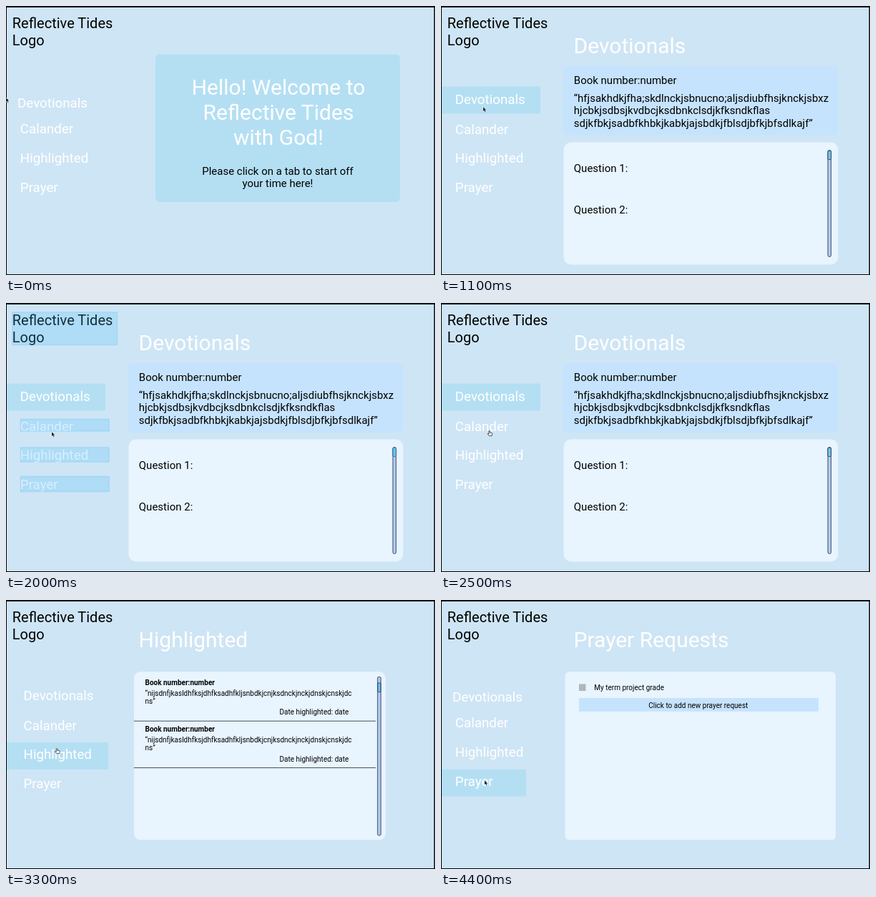
Write an HTML page that moves like this. It is 600 by 376 pixels and loops after 4600 ms.

```html
<!DOCTYPE html>
<html lang="en">
<head>
<meta charset="utf-8">
<title>Devotional app prototype</title>
<style>
  html, body { margin: 0; width: 100%; height: 100%; overflow: hidden; background: #cee5f5; }
  svg { display: block; width: 600px; height: 376px; font-family: Roboto, sans-serif; }

  .logo { font-size: 20px; }
  .nav { font-size: 18.75px; fill: #fff; }
  .title { font-size: 30px; fill: #fff; }
  .body { font-size: 15px; }
  .small { font-size: 10px; }
  .bold { font-weight: 700; }
  .mid { text-anchor: middle; }

  .tab, .card { fill: #b4dff3; }
  .panel { fill: #e8f4fe; }
  .verse { fill: #c6e3fd; }
  .track { fill: #aec8ee; stroke: #28304a; stroke-width: .8; }
  .thumb { fill: #6fc3ec; stroke: #28304a; stroke-width: .8; }
  .rule { stroke: #4a5055; stroke-width: 1; }
  .hint rect { fill: #50c2fa; fill-opacity: .6; stroke: #50bffa; stroke-opacity: .8; stroke-width: 1.5; }

  .page, .hint, .cursor, .arrow, .hand { animation: 4600ms step-end infinite; }
  .home { animation-name: home; }
  .devotionals { animation-name: devotionals; }
  .calendar { animation-name: calendar; }
  .highlighted { animation-name: highlighted; }
  .prayer { animation-name: prayer; }
  .hint { animation-name: hint; }
  .cursor { animation-name: move; }
  .arrow { animation-name: arrow; }
  .hand { animation-name: hand; }

  /* one tick is 100 ms, 1/46 of the loop */
  @keyframes home { 0% { opacity: 1 } 21.73%, 100% { opacity: 0 } }
  @keyframes devotionals { 0% { opacity: 0 } 21.73% { opacity: 1 } 56.52%, 100% { opacity: 0 } }
  @keyframes calendar { 0% { opacity: 0 } 56.52% { opacity: 1 } 71.73%, 100% { opacity: 0 } }
  @keyframes highlighted { 0% { opacity: 0 } 71.73% { opacity: 1 } 86.95%, 100% { opacity: 0 } }
  @keyframes prayer { 0% { opacity: 0 } 86.95%, 100% { opacity: 1 } }

  @keyframes hint {
    0% { opacity: 0 }
    34.78% { opacity: .75 }
    36.95% { opacity: 1; animation-timing-function: steps(5) }
    47.82%, 100% { opacity: 0 }
  }

  @keyframes move {
    0% { transform: translate(0, 128px) }
    2.17% { transform: translate(0, 128px); animation-timing-function: steps(5) }
    13.04% { transform: translate(59px, 133px) }
    23.91% { transform: translate(59px, 141px); animation-timing-function: steps(3) }
    30.43% { transform: translate(64px, 180px) }
    45.65% { transform: translate(64px, 180px); animation-timing-function: steps(4) }
    54.34% { transform: translate(68px, 178px) }
    56.52% { transform: translate(68px, 178px); animation-timing-function: steps(4) }
    65.21% { transform: translate(71.5px, 207px) }
    71.73% { transform: translate(71.5px, 207px); animation-timing-function: steps(5) }
    82.6% { transform: translate(60px, 256px) }
    91.3% { transform: translate(60px, 256px); animation-timing-function: steps(2) }
    95.65%, 100% { transform: translate(61px, 252px) }
  }
  @keyframes arrow {
    0% { opacity: 1 } 10.86% { opacity: 0 } 23.91% { opacity: 1 }
    54.34% { opacity: 0 } 93.47%, 100% { opacity: 1 }
  }
  @keyframes hand {
    0% { opacity: 0 } 10.86% { opacity: 1 } 23.91% { opacity: 0 }
    54.34% { opacity: 1 } 93.47%, 100% { opacity: 0 }
  }
</style>
</head>
<body>
<svg viewBox="0 0 600 376">
  <defs>
    <g id="entry" class="small">
      <text class="bold" x="194.5" y="119">Book number:number</text>
      <text x="194.5" y="133.5">“nijsdnfjkasldhfksjdhfksadhfkljsnbdkjcnjksdnckjnckjdnskjcnskjdc</text>
      <text x="194.5" y="145.2">ns”</text>
      <text x="382.5" y="160.3">Date highlighted: date</text>
      <path class="rule" d="M179 169.2H517"/>
    </g>
  </defs>

  <rect width="600" height="376" fill="#cee5f5"/>

  <g class="page home">
    <rect class="card" x="209" y="67.5" width="342" height="206.5" rx="6"/>
    <g class="title mid">
      <text x="381" y="123.7">Hello! Welcome to</text>
      <text x="381" y="158.7">Reflective Tides</text>
      <text x="381" y="193.7">with God!</text>
    </g>
    <g class="body mid">
      <text x="380" y="235.7">Please click on a tab to start off</text>
      <text x="380" y="253.3">your time here!</text>
    </g>
    <g class="nav">
      <text x="16" y="141.8">Devotionals</text>
      <text x="19.8" y="177.6">Calander</text>
      <text x="19.8" y="218.7">Highlighted</text>
      <text x="19.8" y="259.5">Prayer</text>
    </g>
  </g>

  <g class="page devotionals">
    <rect class="tab" y="112.5" width="139" height="38"/>
    <g class="nav">
      <text x="19.8" y="137.2">Devotionals</text>
      <text x="19.8" y="179">Calander</text>
      <text x="19.8" y="218.7">Highlighted</text>
      <text x="19.8" y="259.5">Prayer</text>
    </g>
    <text class="title" x="185.6" y="66.2">Devotionals</text>
    <rect class="verse" x="170.5" y="84" width="385" height="97" rx="6"/>
    <rect class="panel" x="171.5" y="190.5" width="384" height="171" rx="11"/>
    <g class="body">
      <text x="185.8" y="109">Book number:number</text>
      <text x="185.8" y="133.7">“hfjsakhdkjfha;skdlnckjsbnucno;aljsdiubfhsjknckjsbxz</text>
      <text x="185.8" y="151.2">hjcbkjsdbsjkvdbcjksdbnkclsdjkfksndkflas</text>
      <text x="185.8" y="168.8">sdjkfbkjsadbfkhbkjkabkjajsbdkjfblsdjbfkjbfsdlkajf”</text>
      <text x="185.8" y="232.2">Question 1:</text>
      <text x="185.8" y="290.2">Question 2:</text>
    </g>
    <rect class="track" x="541" y="201.5" width="4.6" height="149" rx="2.3"/>
    <rect class="thumb" x="541" y="202.5" width="4.6" height="12" rx="1.2"/>
  </g>

  <g class="page calendar">
    <rect class="tab" y="151.3" width="144" height="37.5"/>
    <g class="nav">
      <text x="19.8" y="140.2">Devotionals</text>
      <text x="19.8" y="177.6">Calander</text>
      <text x="19.8" y="218.7">Highlighted</text>
      <text x="19.8" y="259.5">Prayer</text>
    </g>
    <text class="title" x="185.6" y="66.2">Calendar</text>
    <rect x="414.4" y="51.7" width="131.5" height="28.4" rx="5" fill="#c8e3fb" stroke="#2b3a4c" stroke-width=".75"/>
    <rect x="421.3" y="57.3" width="66.5" height="11.5" fill="#fff"/>
    <rect x="505.7" y="57.8" width="21.8" height="12.5" fill="#84d190"/>
    <g class="small mid">
      <text x="480.4" y="35.7">Please input your prefered</text>
      <text x="480.4" y="47.4">Devotionals time!</text>
      <text x="516.7" y="67.4">Go!</text>
    </g>
    <rect class="panel" x="173.5" y="100.3" width="378.5" height="235.2" rx="9"/>
  </g>

  <g class="page highlighted">
    <rect class="tab" y="199" width="143.3" height="38"/>
    <g class="nav">
      <text x="24.5" y="140.2">Devotionals</text>
      <text x="24.5" y="182">Calander</text>
      <text x="24.5" y="222.2">Highlighted</text>
      <text x="24.5" y="263">Prayer</text>
    </g>
    <text class="title" x="185.6" y="66.2">Highlighted</text>
    <rect class="panel" x="179" y="100.3" width="352" height="235.2" rx="9"/>
    <use href="#entry"/>
    <use href="#entry" y="65.3"/>
    <rect class="track" x="519.7" y="107.5" width="4.6" height="221.5" rx="1.5"/>
    <rect class="thumb" x="519.9" y="116" width="4.2" height="12.5" rx=".8"/>
  </g>

  <g class="page prayer">
    <rect class="tab" y="236.7" width="119" height="37.8"/>
    <g class="nav">
      <text x="16" y="141.8">Devotionals</text>
      <text x="19.8" y="177.6">Calander</text>
      <text x="19.8" y="218.7">Highlighted</text>
      <text x="19.8" y="259.5">Prayer</text>
    </g>
    <text class="title" x="185.6" y="66.2">Prayer Requests</text>
    <rect class="panel" x="173.5" y="100.3" width="378.5" height="235.2" rx="6"/>
    <rect x="193" y="117.5" width="9.5" height="9.5" fill="#b2b6b8"/>
    <rect class="verse" x="193" y="137" width="335" height="18.7"/>
    <g class="small">
      <text x="214.3" y="125.5">My term project grade</text>
      <text class="mid" x="359.8" y="151">Click to add new prayer request</text>
    </g>
  </g>

  <g class="logo">
    <text x="8.8" y="31.4">Reflective Tides</text>
    <text x="8.8" y="54.8">Logo</text>
  </g>

  <g class="hint">
    <rect x="9" y="13" width="146.5" height="45.5"/>
    <rect x="20.5" y="162.5" width="123.5" height="16.5"/>
    <rect x="20.5" y="202" width="123.5" height="20"/>
    <rect x="20.5" y="242.5" width="123.5" height="21"/>
    <rect x="541.3" y="202.5" width="4" height="12"/>
  </g>

  <path d="M0 0H600V376H0ZM1 2V375H598.6V2Z" fill-rule="evenodd"/>

  <g class="cursor">
    <path class="arrow" d="M0 0V6.3L1.4 5.1L2.4 7.4L3.5 6.9L2.5 4.7H4.4Z" stroke="#fff" stroke-width=".4"/>
    <path class="hand" d="M-1 4V.9Q-.4 0 .2 .9V3L3.2 3.6Q3.9 4 3.7 5L3 7.7H-.6L-2.8 4.8Q-2.5 3.7-1 5Z" fill="#fff" stroke="#222" stroke-width=".8"/>
  </g>
</svg>
</body>
</html>
```
